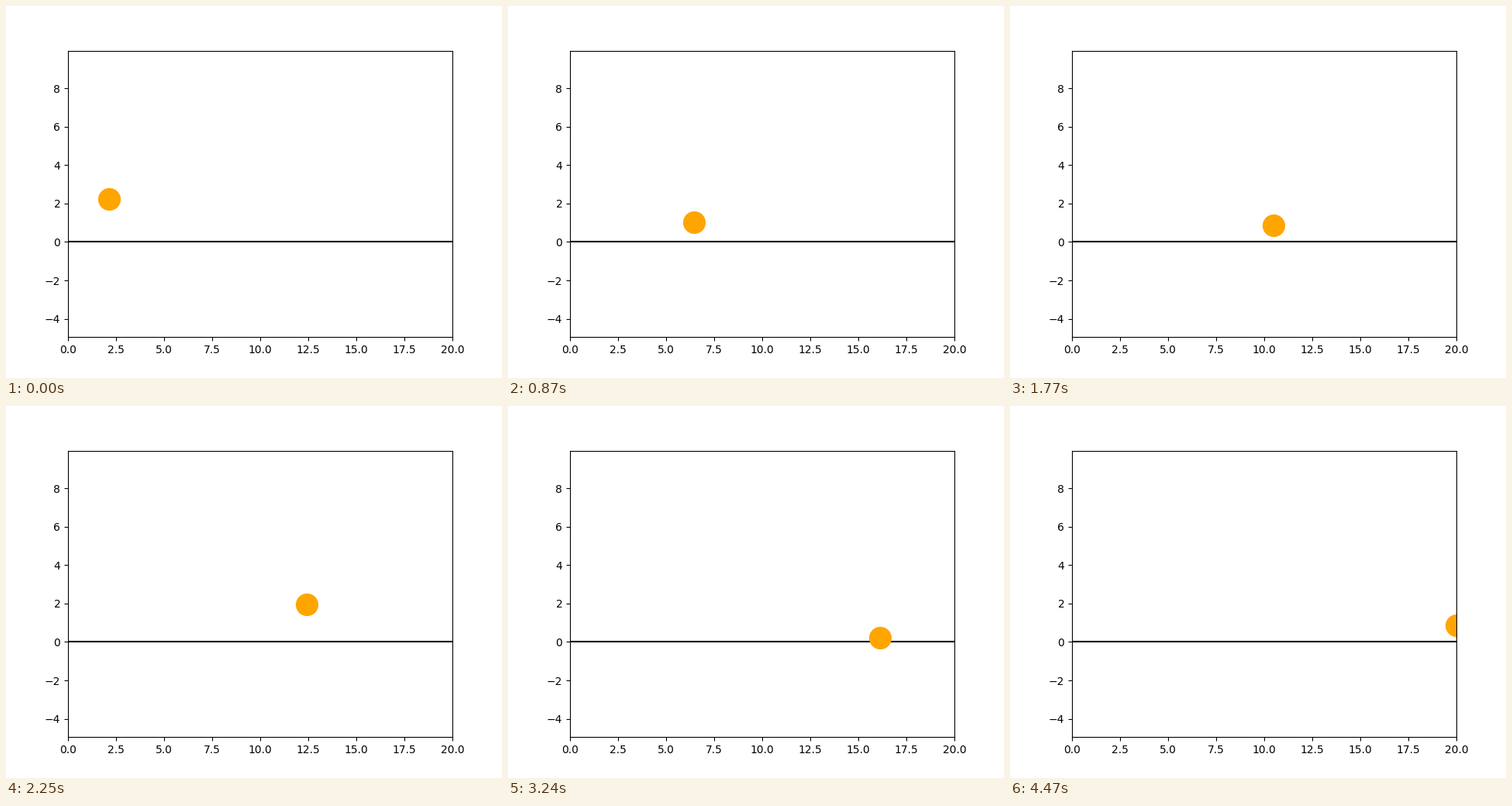
A matplotlib script that plays this animation: 640x480 px, repeating every 4500 ms.

```python
import matplotlib.pyplot as plt
from matplotlib.animation import FuncAnimation

FRAMES = 150
INTERVAL = 30            # ms
SUBSTEPS = 5             # physics steps per drawn frame
DT = 0.01
GRAVITY = 9.8
KEEP_X, KEEP_Y = 0.9, 0.9022   # share of speed kept at a bounce


def simulate():
    """Return the ball's position for every frame."""
    x, y = 2.004, 2.0
    vx, vy = 3.0, 5.0
    path = []
    for _ in range(FRAMES):
        for _ in range(SUBSTEPS):
            x += vx * DT
            y += vy * DT
            vy -= GRAVITY * DT
            if y < 0:
                vx *= KEEP_X
                vy *= -KEEP_Y
        path.append((x, y))
    return path


path = simulate()

fig = plt.figure(figsize=(6.4, 4.8), dpi=100)
ax = fig.add_axes([0.125, 0.11, 0.775, 0.77])

# Equal scale on both axes, centred vertically on 2.5
half_height = 0.5 * 20 * (0.77 * 4.8) / (0.775 * 6.4)
ax.set_xlim(0, 20)
ax.set_ylim(2.5 - half_height, 2.5 + half_height)

ax.plot([0, 20], [0, 0], color="black", lw=1.5)
ball, = ax.plot([], [], "o", color="orange", markersize=20)


def update(i):
    x, y = path[i]
    ball.set_data([x], [y])
    return ball,


anim = FuncAnimation(fig, update, frames=FRAMES, interval=INTERVAL,
                     repeat=True, repeat_delay=0)
plt.show()
```
